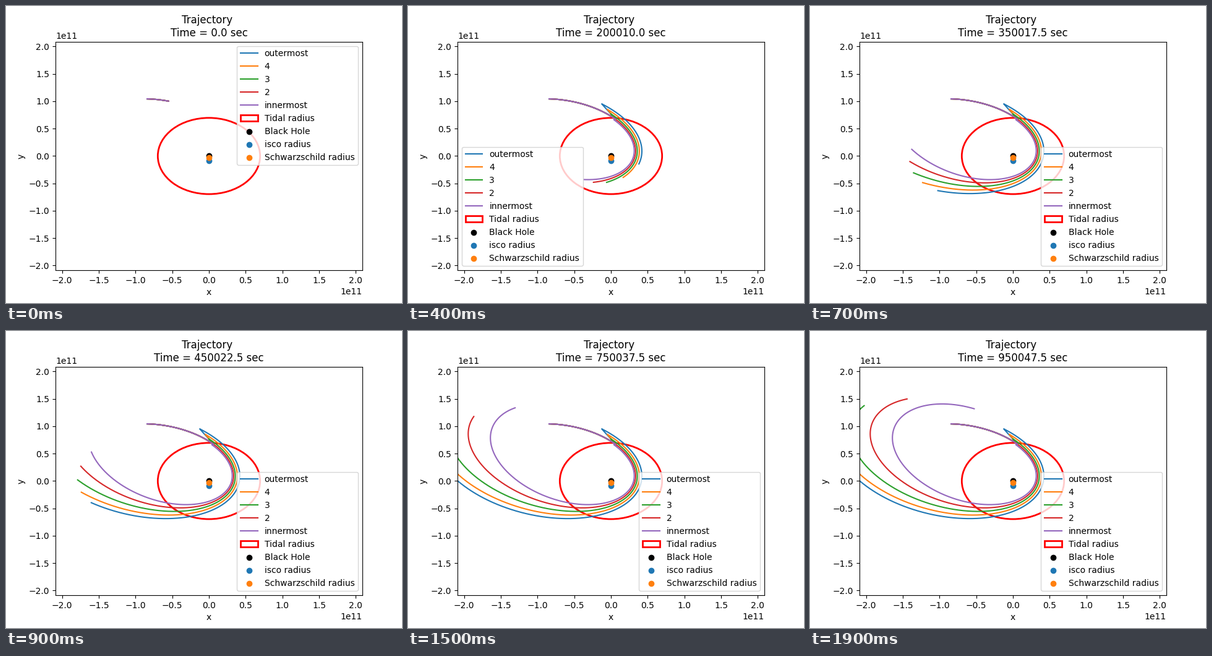
Animation, 640 px wide and 480 px high, one loop 9400 ms. Source, as a matplotlib script:

```python
import numpy as np
import matplotlib.pyplot as plt
from matplotlib.animation import FuncAnimation
from matplotlib.patches import Circle

UNIT = 1e11
TIDAL_RADIUS = 6.9634e10
SCHWARZSCHILD = 2.95e9
STEP_SECONDS = 50002.5
LAST_STEP = 19
LOOP_FRAMES = 94
BREAKUP_STEP = 1.84


class Orbit:
    """Precessing ellipse, clockwise around the origin, swept at a constant areal rate.

    1/r swings between far and near with angular frequency k about the angle closest.
    """

    def __init__(self, far, near, k, closest, spin, start, end, first_step):
        phi = np.radians(np.linspace(start, end, 5000))
        swing = np.cos(k * (phi - np.radians(closest)))
        r = 1 / ((near + far) / 2 + (near - far) / 2 * swing)
        self.x = r * np.cos(phi) * UNIT
        self.y = -r * np.sin(phi) * UNIT
        swept = np.cumsum((r[1:] ** 2 + r[:-1] ** 2) / 2 * np.diff(phi))
        self.step = first_step + np.append(0, swept) / spin

    def until(self, step):
        count = np.searchsorted(self.step, step, side="right")
        return self.x[:count], self.y[:count]


def debris_orbit(i):
    """Orbit of shell i, counted from the outermost: deeper shells are bound more tightly."""
    return Orbit(
        far=0.380 + 0.0116 * (i - 0.5) ** 2,
        near=2.455 + 0.233 * i,
        k=0.96 - 0.003 * i,
        closest=18.5 + 1.15 * i + 0.28 * i ** 2,
        spin=0.3155 - 0.0103 * i,
        start=-97.5 + 4.6 * i - 0.47 * i ** 2,
        end=260,
        first_step=BREAKUP_STEP,
    )


star = Orbit(far=0.551, near=3.131, k=0.95, closest=27, spin=0.272,
             start=-128.9, end=-84.6, first_step=-1)
shells = ["outermost", "4", "3", "2", "innermost"]
orbits = [debris_orbit(i) for i in range(len(shells))]

fig, ax = plt.subplots(figsize=(6.4, 4.8), dpi=100)
limit = 3 * TIDAL_RADIUS
ax.set(xlim=(-limit, limit), ylim=(-limit, limit), xlabel="x", ylabel="y")
title = ax.set_title("Trajectory \nTime = 0.0 sec")

lines = [ax.plot([], [], label=name)[0] for name in shells]
ax.add_patch(Circle((0, 0), TIDAL_RADIUS, fill=False, edgecolor="red",
                    linewidth=2, label="Tidal radius"))
ax.scatter(0, 0, color="black", label="Black Hole")
ax.scatter(0, -3 * SCHWARZSCHILD, color="C0", label="isco radius")
ax.scatter(0, -SCHWARZSCHILD, color="C1", label="Schwarzschild radius")
legend = ax.legend(loc="upper right")


def legend_corner(step):
    if step < 4:
        return "upper right"
    return "lower left" if step == 4 else "lower right"


def draw(frame):
    step = min(frame, LAST_STEP)
    for line, orbit in zip(lines, orbits):
        line.set_data(np.hstack([star.until(step), orbit.until(step)]))
    title.set_text(f"Trajectory \nTime = {step * STEP_SECONDS:.1f} sec")
    legend.set_loc(legend_corner(step))
    return [*lines, title, legend]


anim = FuncAnimation(fig, draw, frames=LOOP_FRAMES, interval=100, repeat=True, repeat_delay=0)
plt.show()
```
